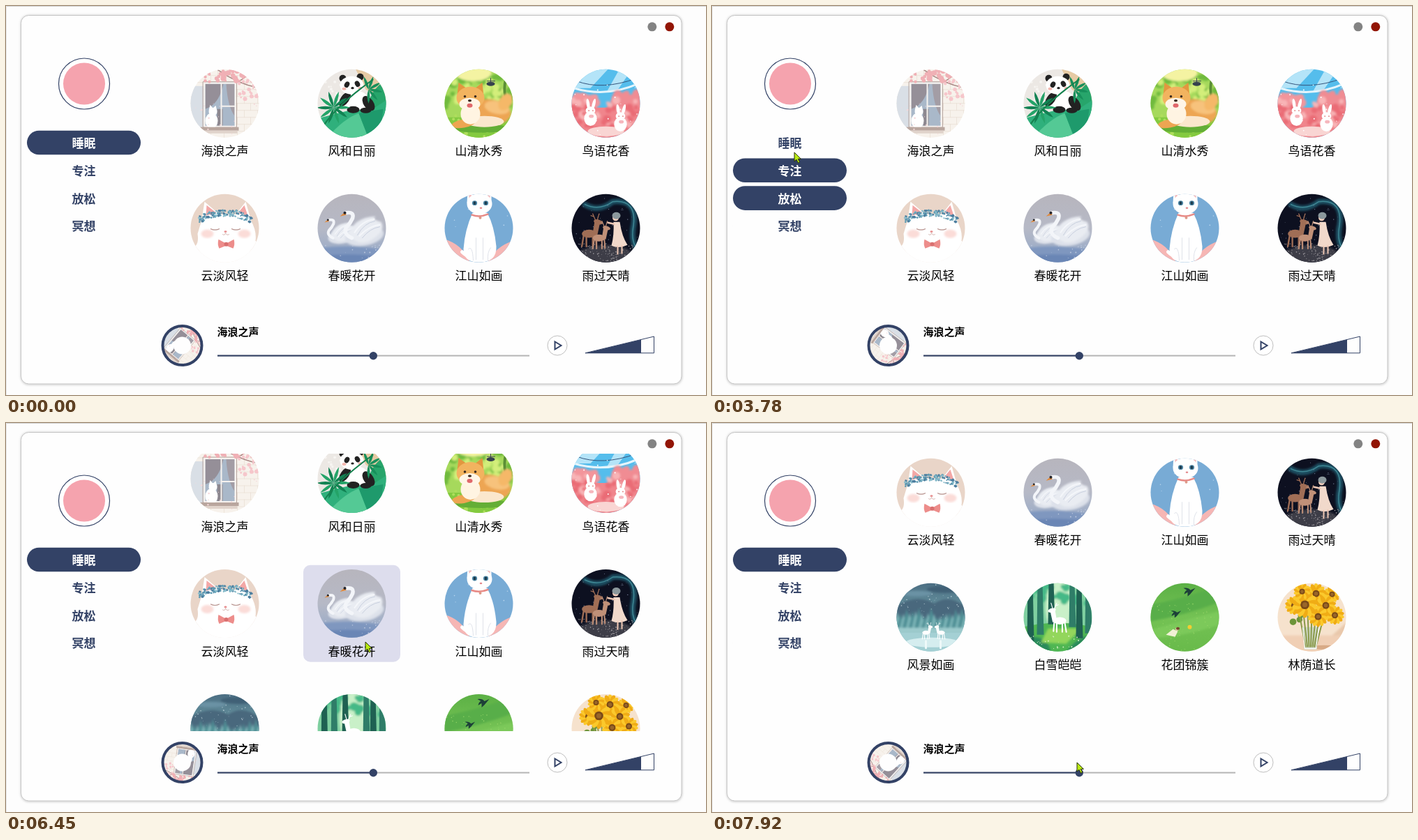
Write an HTML page that moves like this. It is 1003x558 px and loops after 7.99 s.

```html
<!DOCTYPE html>
<html lang="zh-CN">
<head>
<meta charset="utf-8">
<style>
html, body { margin: 0; width: 100%; height: 100%; overflow: hidden; background: #fdfdfd }
svg { display: block; width: 1003px; height: 558px }
text { font: 17px "Noto Sans CJK SC", "Noto Sans CJK JP", "Noto Sans CJK", sans-serif }
.mid { text-anchor: middle }
.bold { font-weight: 700 }
</style>
</head>
<body>
<svg id="stage" viewBox="0 0 1003 558"></svg>
<script>
const NAVY = '#334266', LOOP = 7990, STEP = 179;

// Drawing helpers, all returning SVG markup
const p = (fill, d) => `<path fill="${fill}" d="${d}"/>`;
const l = (stroke, w, d) => `<path fill="none" stroke="${stroke}" stroke-width="${w}" stroke-linecap="round" d="${d}"/>`;
const e = (fill, x, y, rx, ry = rx, turn = 0) =>
  `<ellipse cx="${x}" cy="${y}" rx="${rx}" ry="${ry}" fill="${fill}" transform="rotate(${turn} ${x} ${y})"/>`;
const r = (fill, x, y, w, h, rx = 0) => `<rect x="${x}" y="${y}" width="${w}" height="${h}" rx="${rx}" fill="${fill}"/>`;
const bg = fill => r(fill, -50, -50, 100, 100);
const g = (move, body) => `<g transform="${move}">${body}</g>`;
const blur = body => `<g filter="url(#soft)">${body}</g>`;
const many = (n, draw) => Array.from({ length: n }, (_, i) => draw(i)).join('');
let seed = 7;
const rand = (a, b) => a + (b - a) * ((seed = seed * 16807 % 2147483647) / 2147483647);
const dots = (n, fill, x0, y0, x1, y1, size) => many(n, () => e(fill, rand(x0, x1), rand(y0, y1), rand(.4, 1) * size));
const fade = (id, ...stops) => `<linearGradient id="${id}" x2="0" y2="1">` +
  stops.map((c, i) => `<stop offset="${i / (stops.length - 1)}" stop-color="${c}"/>`).join('') + '</linearGradient>';

const bunny = e('#fff', 0, 6, 8, 9) + e('#fff', 0, -4, 6, 5) + e('#fff', -3, -12, 2, 7, -8) +
  e('#fff', 4, -12, 2, 7, 14) + e('#d77', -2, -4, .8) + e('#d77', 3, -4, .8) + e('#f6b7bd', 1, 3, 3, 2);
const deer = fill => e(fill, 0, 0, 8, 4.5) + p(fill, 'M4-1L6-13 12-12 9 2Z') + e(fill, 10, -13, 5, 2.6, 15) +
  l(fill, 1.8, 'M-6 2L-8 14M-3 2L-3 14M4 2L4 14M7 1L8 13') + l(fill, 1, 'M7-15L4-22M9-15L11-22M5-19L2-20');
const swallow = p('#1d4038', 'M-8-4Q-1-5 2-1L9-4 4 2Q2 5-2 8L-2 2-7 5Q-6 0-3-1Z');
const swan = blur(e('#dde1ea', 18, 11, 28, 14, -10) + p('#e9ecf2', 'M-5 8Q5-16 34-17Q28-12 42-9Q50 5 24 19Q5 25-5 8Z')) +
  l('#f4f6fa', 2, 'M4 6Q14-10 32-13M11 11Q24-3 40-5') + l('#c8cfde', 1, 'M8 10Q18-8 33-10M15 14Q26 0 40-2') +
  l('#f3f5f9', 5.5, 'M-8-22Q4-24 1-14Q-2-7-8-1Q-13 8 0 14') + p('#e08a3d', 'M-9-24L-17-17-8-19Z') + e('#23252c', -10, -22, 2);
const flower = (x, y, s) => g(`translate(${x} ${y}) scale(${s})`,
  many(14, i => g(`rotate(${i * 25.7})`, e(i % 2 ? '#f0ac15' : '#fbc92c', 0, -7.5, 3, 6))) +
  e('#7a4a18', 0, 0, 4.5) + e('#99662a', 0, 0, 2.5));

const art = [
  // Cat in a window
  bg('#f7f2ec') + many(11, i => l('#e8dfd3', .7, `M-50 ${i * 10 - 50}H50`) +
    many(6, k => l('#e8dfd3', .7, `M${k * 19 - 48 + i % 2 * 9} ${i * 10 - 50}v10`))) +
  p('#d9dfe6', 'M-50-25H-30V36H-50Z') + r('#a9b8c9', -29, -30, 44, 65) +
  p('#958f98', 'M-28-28H-2Q-7-4-21 5L-28 8Z') + p('#a39da5', 'M2-28H14V18Q4 4 2-28Z') + r('#8d8890', -11, 8, 8, 26) +
  l('#b5a49e', 1, 'M-31-31H17V34H-31Z') + l('#f6f2ef', 2, 'M-29-29H15V33H-29ZM-5-28V33M-4 4H15') +
  e('#fff', -19, 25, 9, 11) + e('#fff', -17, 12, 6) + p('#fff', 'M-23 10L-21 2-17 7-13 3-11 11Z') +
  r('#b9a69e', -36, 34, 56, 5) + r('#e0d3cb', -34, 39, 52, 4) +
  l('#a88683', 1.5, 'M49-22Q18-28-10-48M20-32Q30-36 38-48') +
  dots(42, '#f0b0b5', -28, -49, 49, -31, 4) + dots(22, '#f6c6cb', 20, -38, 49, -6, 3) + dots(22, '#f5d6d8', -45, 0, 46, 46, 1.2),
  // Panda
  bg('#ece8e4') + p('#e6caa4', 'M5-50H50V0L20-20Z') + p('#27a56b', 'M50-34Q25-20 22 10L50 20Z') +
  dots(20, '#f7f5f2', -45, -40, -10, 0, 2) + p('#2fb07c', 'M-50 22L-20 14 5 8 30 8 50-5V50H-50Z') +
  p('#54c995', 'M-36 50Q-12 22 10 14L24 50Z') + p('#1e9a6c', 'M10 14L45 8 40 50H24Z') +
  e('#fff', 6, -4, 18, 14) + e('#222', -10, -6, 6, 12, 35) + e('#222', 24, 0, 7, 12, -35) + e('#222', 2, 9, 9, 5) + e('#222', 20, 10, 8, 4) +
  e('#222', -13, -36, 5) + e('#222', 12, -38, 5) + e('#fff', 0, -26, 17, 13) +
  e('#222', -7, -27, 3.5, 4.5, 30) + e('#222', 8, -28, 3.5, 4.5, -30) + e('#222', 1, -22, 2.2, 1.6) +
  e('#f4b8b0', -11, -21, 3, 2) + e('#f4b8b0', 12, -22, 3, 2) +
  many(10, i => g(`translate(-26 6) rotate(${i * 36})`, p(i % 2 ? '#128253' : '#24a368', 'M0 0Q12-5 24 0Q12 4 0 0Z'))) +
  many(6, i => g(`translate(24 -20) rotate(${i * 40 - 110})`, p('#178f5b', 'M0 0Q10-4 20 0Q10 4 0 0Z'))) +
  l('#15824f', 2, 'M-46 40Q-25 5 30-34'),
  // Shiba
  bg('#a6d95c') + blur(dots(40, '#6fba3e', -49, -45, 49, 5, 8) + dots(26, '#d3ee7a', -45, -48, 40, 5, 6) + e('#f4f3a2', -8, -44, 26, 12)) +
  l('#5b8f35', 4, 'M38-10Q34-30 44-48') + r('#84ca40', -50, 20, 100, 30) + dots(30, '#aede5c', -48, 16, 48, 48, 3) +
  e('#64ae36', 4, 36, 42, 6) + blur(e('#eda552', 16, 12, 30, 18, 8) + e('#f7c27c', 26, 6, 18, 9, 12) + e('#f5b868', 38, -2, 9, 13, 30)) +
  e('#fbe7cd', 8, 26, 28, 8) + e('#eda552', -22, 29, 17, 6, -10) + e('#fff4e2', -12, 15, 14, 15) +
  p('#e2973f', 'M-31-12L-29-30-18-22ZM-5-22L5-30 7-10Z') + e('#f2b35f', -12, -8, 20, 16) + e('#fff5e6', -13, 1, 15, 9) +
  e('#3a2a20', -20, -10, 1.8) + e('#3a2a20', -5, -10, 1.8) + e('#3a2a20', -13, -4, 2.6, 1.8) + e('#e0686b', -13, 3, 4, 3) +
  e('#36424e', 17, -28, 6, 3) + l('#36424e', 1, 'M17-28V-36M12-32H23'),
  // Two rabbits
  bg('#55bdec') + p('#b4e4f8', 'M-20-50L-46-22H-22L4-50ZM20-50L2-18H16L38-50Z') + l('#e4f5fc', 3, 'M-46-22Q0-8 46-28') +
  l('#34557c', 1, 'M-42-32Q-5-18 44-36') + blur(dots(30, '#f3959b', -48, -10, -14, 10, 9) + dots(30, '#f08c93', 14, -14, 48, 10, 9)) +
  r('#f0858c', -50, 6, 100, 46) + blur(dots(34, '#f8b4b6', -48, -6, 48, 48, 6) + dots(34, '#ea6c76', -48, 4, 48, 48, 6)) +
  e('#f9d5d3', 0, 40, 26, 7) + dots(28, '#fff', -46, -30, 46, 46, 1.1) +
  g('translate(-22 15) scale(1.15)', bunny) + g('translate(21 23) scale(1.15)', bunny),
  // Cat with a flower crown
  bg('#e9d5c8') + p('#fff', 'M-34-6L-29-38-8-20H16L30-38 39-6Z') + p('#f3a7a6', 'M-27-18L-26-33-12-22ZM19-22L28-33 33-18Z') +
  p('#fff', 'M-33-12Q0-28 37-12Q46 4 44 18L50 24V50H-50V28Q-36 28-39 8Z') + r('#fff', -50, 33, 100, 17) +
  many(150, () => { const x = rand(-37, 39); return e(['#5d9ab2', '#88bccb', '#4c7d9e'][Math.floor(rand(0, 3))], x, x * x / 140 - 22 + rand(-5, 5), rand(.7, 1.9)); }) +
  blur(e('#fbdcd8', -25, 8, 9, 6) + e('#fbdcd8', 28, 8, 9, 6)) + l('#b58f8a', 1.2, 'M-20 1Q-14 4-8 1M10 1Q16 4 22 1') +
  e('#e78f90', 1, 5, 2, 1.4) + l('#c9a39e', .8, 'M-3 9Q0 11 1 7Q3 11 6 9') +
  p('#ed8d8b', 'M2 22L-9 16Q-11 23-8 29L2 25 12 29Q15 23 13 16Z') + e('#d97070', 2, 23, 3),
  // Swans
  bg('url(#dusk)') + blur(p('#7f97bf', 'M-50 29Q0 22 50 32V50H-50Z') + p('#6a86b5', 'M-50 40Q0 34 50 42V50H-50Z')) +
  dots(25, '#b9c5dc', -48, 24, 48, 48, 1) + g('translate(-27 4) scale(.72)', swan) + swan,
  // White cat
  bg('#78abd5') + p('#f6b6b4', 'M-50 16Q-24 22-12 50H-50ZM50 18Q24 26 12 50H50Z') + dots(9, '#b9d5ec', -44, -35, 44, 10, 1) +
  l('#fff', 5, 'M10 45Q-12 46-24 34') + p('#fff', 'M-9-22Q-20 2-22 30Q-22 49 0 49Q26 49 25 26Q22-4 12-22Z') +
  p('#fff', 'M-17-36L-16-53-4-45ZM7-46L18-52 18-36Z') + p('#f3b6b6', 'M-14-42L-14-50-8-45ZM11-45L16-50 16-41Z') +
  e('#fff', 1, -35, 18, 15) + e('#4d86a5', -6, -36, 3.6, 3.4) + e('#4d86a5', 10, -36, 3.6, 3.4) + e('#1b3a4c', -6, -36, 1.8, 2.4) +
  e('#1b3a4c', 10, -36, 1.8, 2.4) + e('#e48a8d', 3, -29, 1.8, 1.2) + l('#e88a86', 2.5, 'M-10-19Q1-15 13-20') + e('#d98', 2, -15, 2) +
  l('#dfe2e9', 1, 'M-4 14V45M6 14V45M-15 30Q-9 24-8 46M17 28Q12 34 13 46'),
  // Girl and deer at night
  bg('#0d1020') + blur(l('#1c4d60', 8, 'M-30-34Q-10-22 10-38Q48-42 39 0Q36 20 46 32')) + l('#3f8794', 1.5, 'M-30-34Q-10-24 10-38Q46-42 39 0Q36 20 46 32') +
  dots(45, '#77839b', -46, -45, 46, 18, .7) + blur(e('#3d3c46', 0, 48, 46, 24)) + dots(150, '#98959a', -45, 22, 45, 48, .9) +
  g('translate(-24 8) scale(1.3)', deer('#a06e56')) + g('translate(-10 14) scale(1.1)', deer('#c09078')) +
  p('#f1d9cb', 'M11-9H20Q23 12 31 24Q19 30 8 25Q12 10 11-9Z') + l('#efc8b5', 2.5, 'M12-6L3-8') + l('#efc8b5', 2, 'M17 26V37M23 25V36') +
  e('#f1cdbb', 14, -15, 4.5) + e('#8b989c', 15, -18, 6, 5),
  // Lakeside deer
  bg('url(#lake)') + blur(p('#48687d', 'M-50-16Q-20-34 5-20Q27-34 50-15V5H-50Z') + e('#3f6076', 20, -40, 26, 5) + e('#6a92a4', -20, -34, 22, 4)) +
  dots(45, '#b7cbd4', -48, -48, 48, 10, .8) +
  blur(many(24, i => p(i % 2 ? '#4f8f95' : '#7ab3b6', `M${i * 4.4 - 55} 22l7-${28 + rand(-5, 8)} 7 28Z`)) + r('#9ccacc', -55, 15, 110, 8)) +
  r('#a4d0d4', -50, 22, 100, 28) + e('#d5edef', 2, 36, 38, 7) + g('translate(-7 22) scale(.65)', deer('#fff')) + g('translate(15 22) scale(-.65 .65)', deer('#fff')) +
  l('#eef9f9', 3, 'M-7 34V44M14 34V44'),
  // Forest deer
  bg('#7fd0a0') + blur(e('#c9f0c8', 2, -14, 20, 38) + dots(25, '#45b987', -48, -48, 48, -20, 7)) + p('#4fb652', 'M-50 14Q0 2 50 14V50H-50Z') +
  blur(p('#2c8a5c', 'M-50 30Q-15 22-10 50H-50ZM50 24Q25 30 12 50H50Z') + p('#93d65c', 'M-14 16H34L12 38-24 36Z')) +
  many(6, i => p(i % 2 ? '#2f7d68' : '#1f6152', `M${[-43, -29, -13, 17, 27, 40][i]}-50h7l2 ${[85, 75, 60, 64, 80, 73][i]}h-10Z`)) +
  g('translate(3 5) scale(-1.15 1.15)', deer('#fff')) + dots(30, '#d9f2c6', -42, 27, 42, 46, 1),
  // Swallows over a meadow
  bg('url(#field)') + blur(p('#59ae48', 'M-50-18Q-5-26 50-46V-22Q0-3-50 6Z') + p('#7cc95a', 'M-50 18Q0 4 50-9V10Q0 28-50 30Z')) +
  dots(80, '#94d366', -48, -20, 48, 48, .8) + g('translate(6 -38)', swallow) + g('translate(-13 -6) scale(.85)', swallow) +
  p('#f1f1d6', 'M-17 17L-27 25-14 28-10 20Z') + e('#f0cfb0', -11, 17, 2.4) + e('#73482e', -10, 16, 2.6, 2) + e('#f2ce32', 7, 14, 3),
  // Sunflowers
  bg('#f6e2cd') + blur(p('#e9c8ab', 'M8 45L50 7V45Z') + p('#f0cfb5', 'M-50 26H50V50H-50Z')) +
  e('#d8aa86', 18, 43, 24, 3) + dots(14, '#6c9439', -28, -25, 32, 12, 5) +
  g('translate(-1 0)', p('#cfd8c6', 'M-12 14H11L8 46H-10Z')) + many(7, i => l('#8a9a4a', 2, `M${i * 6 - 18}-5L${i * 2.5 - 9} 42`)) +
  l('#fff', 1.2, 'M-13 15L-10 45H6L10 15') +
  many(6, i => flower([-25, 6, 29, 20, 33, 9][i], [-17, -34, -33, -17, -3, -1][i], [1, 1.1, .9, 1.1, 1, 1.1][i])) + flower(-10, -18, 1.4) + flower(-14, -37, .9)
];

const menu = ['睡眠', '专注', '放松', '冥想'];
const tracks = ['海浪之声', '风和日丽', '山清水秀', '鸟语花香', '云淡风轻', '春暖花开', '江山如画', '雨过天晴', '风景如画', '白雪皑皑', '花团锦簇', '林荫道长'];
const stage = document.getElementById('stage');

stage.innerHTML = `<defs>
  <clipPath id="round"><circle r="49"/></clipPath>
  <clipPath id="view"><rect x="223" y="44" width="700" height="398"/></clipPath>
  <filter id="soft"><feGaussianBlur stdDeviation="1.5"/></filter>
  ${fade('dusk', '#b7b5bd', '#b6b9c6', '#8fa6c8')}${fade('lake', '#4b6d82', '#6f9fa8', '#b7dadd')}${fade('field', '#5bb045', '#74c254', '#68ba4a')}
  ${art.map((a, i) => `<g id="art${i}" clip-path="url(#round)">${a}</g>`).join('')}</defs>` +
  r('#fdfdfd', 0, 0, 1003, 558) + r('#d4d4d4', 0, 0, 1003, 1) + r('#e6e6e6', 0, 0, 1, 558) +
  '<rect x="22" y="14" width="946" height="528.5" rx="11" fill="none" stroke="#ccc" stroke-width="2.5" filter="url(#soft)"/>' +
  '<rect x="21.5" y="13.5" width="946.5" height="528.5" rx="11" fill="#fefefe" stroke="#c6c6c6"/>' +
  e('#838383', 925.8, 29.8, 6.5) + e('#921505', 950.8, 29.8, 6.5) +
  `<circle cx="112" cy="111.5" r="36.5" fill="#fff" stroke="${NAVY}" stroke-width="1.2"/>` + e('#f5a3ae', 112, 111.5, 30) +
  menu.map((name, i) => `<g class="item">${r(NAVY, 30, 178.7 + i * 39.8, 163, 34.6, 17.3)}
    <text class="mid bold" x="111.5" y="${203 + i * 39.8}">${name}</text></g>`).join('') +
  `<g clip-path="url(#view)"><g id="list">` + tracks.map((name, i) =>
    g(`translate(${313.5 + i % 4 * 182} ${139.7 + (i >> 2) * STEP})`,
      `<rect class="cell" x="-69.5" y="-55.3" width="139" height="139" rx="10" fill="#dddded"/>
      <use href="#art${i}"/><text class="mid" y="74.5">${name}</text>`)).join('') + '</g></g>' +
  `<g id="disc"><use href="#art0" transform="scale(.58)"/></g>` + e('#fefefe', 252.5, 487, 12.5) +
  `<circle cx="252.5" cy="487" r="28" fill="none" stroke="${NAVY}" stroke-width="4"/>` +
  '<text class="bold" x="302.5" y="473.3" style="font-size:15px">海浪之声</text>' +
  r('#b5b5b5', 303, 500.6, 447, 2) + r(NAVY, 303, 500.6, 223, 2) + e(NAVY, 526.3, 501.7, 5.7) +
  '<circle cx="790" cy="487" r="14" fill="#fff" stroke="#bfbfbf"/>' +
  `<path d="M786.5 481.5L795.5 487 786.5 492.5Z" fill="none" stroke="${NAVY}" stroke-width="2"/>` +
  p(NAVY, 'M830 498L910 478.5V498Z') + `<path d="M830 497.8L928.5 474V497.8Z" fill="none" stroke="${NAVY}"/>` +
  '<path id="pointer" d="M0 0V13L3 10.3 5.4 15.2 7.7 14 5.4 9.4H9.4Z" fill="#b9ea13" stroke="#26300d"/>';

const [list, disc, pointer] = ['list', 'disc', 'pointer'].map(id => document.getElementById(id));
const items = [...stage.querySelectorAll('.item')], cells = [...stage.querySelectorAll('.cell')];

// Each row is [start time, value]
const selected = [[0, 0], [2100, 2], [4300, 0]];
const hoveredItem = [[0, -1], [1360, 3], [1560, 2], [3250, 1], [3810, 0], [4870, -1]];
const hoveredCell = [[0, -1], [5500, 5], [7250, 9], [7650, -1]];
const scroll = [[0, 0], [6390, 59.7], [6560, 119.4], [6720, 179], [7000, 219]];
const path = [[0, 118, 575], [450, 118, 560], [850, 126, 508], [1280, 92, 345], [1530, 92, 277], [1750, 96, 272], [3000, 108, 268],
  [3250, 112, 250], [3780, 118, 210], [4000, 122, 196], [4780, 135, 190], [4950, 252, 224], [5280, 396, 254], [5500, 470, 288],
  [5770, 515, 314], [7450, 515, 314], [7880, 523, 487], [LOOP, 523, 487]];

const at = (rows, t) => rows.findLast(row => row[0] <= t)[1];
function along(t) {
  const i = path.findIndex(row => row[0] > t), a = path[i - 1], b = path[i];
  const k = (t - a[0]) / (b[0] - a[0]);
  return [1, 2].map(n => a[n] + (b[n] - a[n]) * k);
}

function draw(now) {
  const t = now % LOOP;
  items.forEach((item, i) => {
    const on = i === at(selected, t) || i === at(hoveredItem, t);
    item.firstElementChild.style.opacity = +on;
    item.lastElementChild.style.fill = on ? '#fff' : NAVY;
  });
  cells.forEach((cell, i) => cell.style.opacity = +(i === at(hoveredCell, t)));
  list.setAttribute('transform', `translate(0 ${-at(scroll, t)})`);
  disc.setAttribute('transform', `translate(252.5 487) rotate(${40 + t * .023})`);
  pointer.setAttribute('transform', `translate(${along(t)})`);
  requestAnimationFrame(draw);
}
requestAnimationFrame(draw);
</script>
</body>
</html>
```
